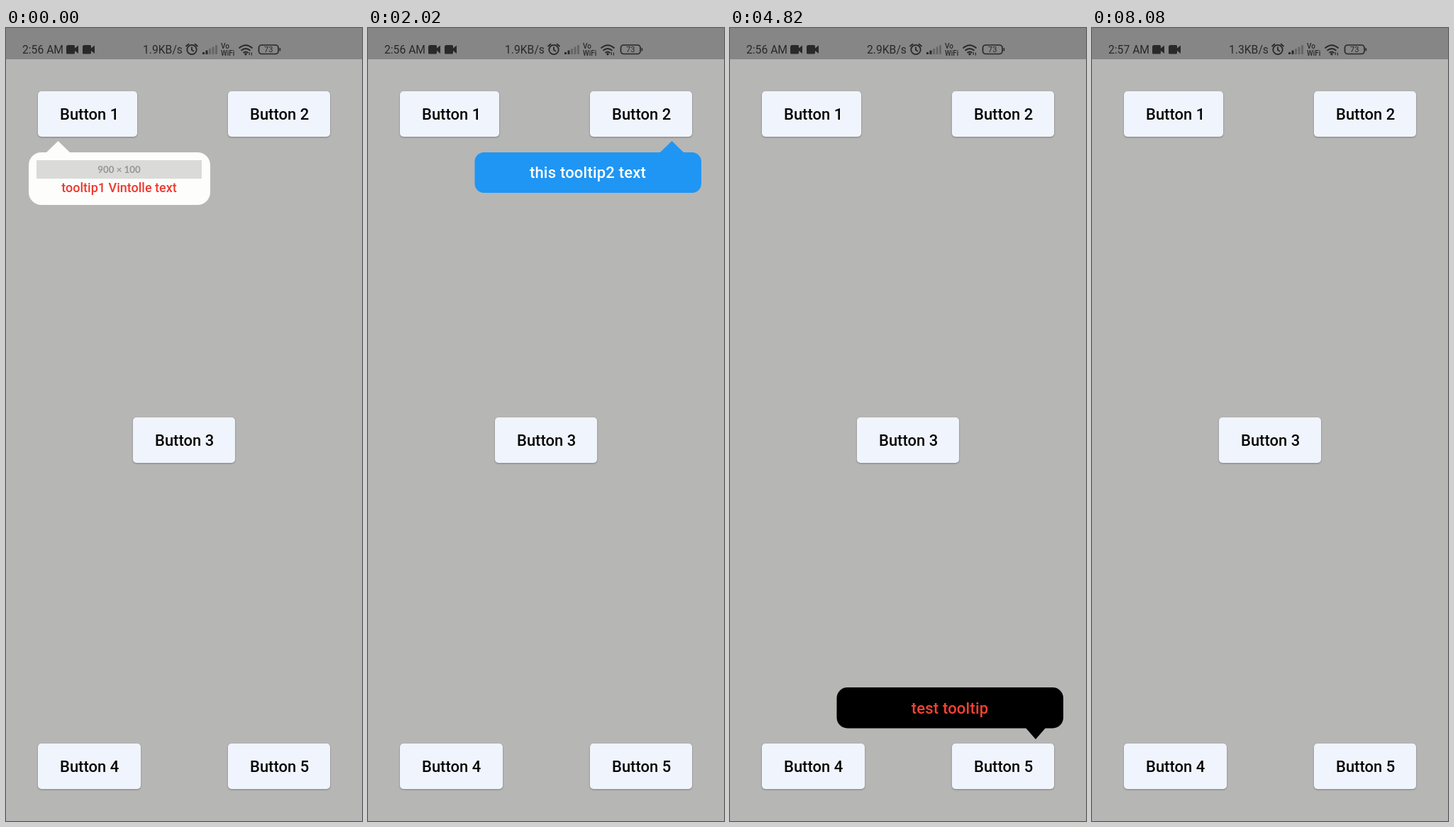
These frames come from a looping animation (502x1116 px, 8.12 s). An HTML page:

```html
<!DOCTYPE html>
<html lang="en">
<head>
<meta charset="utf-8">
<title>Tooltip tour</title>
<style>
  html, body { margin: 0; width: 100%; height: 100%; overflow: hidden; background: #b6b6b5; }
  svg { display: block; width: 502px; height: 1116px; }
  text { font-family: Roboto, "Open Sans", sans-serif; white-space: pre; }
  .label { font-size: 22px; font-weight: 500; fill: #050505; }
  .button { fill: #f0f4fc; filter: drop-shadow(0 1px 1px rgba(0, 0, 0, .3)); }
  .status { font-size: 15.7px; fill: #292929; }
  .tip { visibility: hidden; }
  .tip text { font-weight: 500; }
  .tip .size { font-family: Lato, sans-serif; font-weight: 700; fill: #969696; }
</style>
</head>
<body>
<svg viewBox="0 0 502 1116">
  <rect width="502" height="1116" fill="#b6b6b5"/>
  <rect width="502" height="44" fill="#868686"/>

  <g class="status">
    <text id="clock" x="23" y="36"></text>
    <text id="speed" x="193" y="36"></text>
    <path id="cam" d="M86.5 24h9q1.500 0 1.500 1.500v3l5-4v11.500l-5-4v3q0 1.500-1.500 1.500h-9q-1.500 0-1.500-1.500v-9q0-1.500 1.500-1.500z"/>
    <use href="#cam" x="23"/>
    <g fill="none" stroke="#292929" stroke-width="1.8">
      <circle cx="262" cy="30.500" r="6.700"/>
      <path d="M262 26.500v4.500l3 1.800M253.500 26l4.500-3.800M270.500 26l-4.500-3.800"/>
    </g>
    <g id="bars"></g>
    <g font-size="10" font-weight="500">
      <text x="303" y="28.500">Vo</text>
      <text x="303" y="38.500">WiFi</text>
    </g>
    <g fill="none" stroke="#292929" stroke-width="1.900">
      <path d="M328.500 28.500q9.500-8.500 19 0M331.500 31.800q6.500-5.600 13 0M334.500 35q3.500-3 7 0"/>
    </g>
    <circle cx="338" cy="36.800" r="1.700"/>
    <path d="M343.200 38v-4M346.400 34.500v4" stroke="#292929" stroke-width="1.200"/>
    <rect x="356.500" y="24" width="27.500" height="12.500" rx="4" fill="none" stroke="#292929" stroke-width="1.700"/>
    <rect x="385.500" y="28" width="1.700" height="4.500" rx=".8"/>
    <text x="370.200" y="34.200" font-size="11" text-anchor="middle">73</text>
  </g>

  <g id="buttons"></g>
  <g id="tips"></g>
</svg>

<script>
const LOOP = 8120;
const $ = id => document.getElementById(id);

function add(parent, tag, attrs, text = "") {
  const el = document.createElementNS("http://www.w3.org/2000/svg", tag);
  for (const key in attrs) el.setAttribute(key, attrs[key]);
  el.textContent = text;
  parent.append(el);
  return el;
}

for (let i = 0; i < 5; i++) {
  const h = 3 + i * 2.5;
  add($("bars"), "rect", { x: 277 + i * 4.5, y: 37 - h, width: 3, height: h, rx: .6,
    fill: i < 2 ? "#292929" : "#666" });
}

// x, y, width
[[45, 89, 140], [313, 89, 144], [179, 548, 144], [45, 1007, 145], [313, 1007, 144]]
  .forEach(([x, y, width], i) => {
    add($("buttons"), "rect", { class: "button", x, y, width, height: 64, rx: 5 });
    add($("buttons"), "text", { class: "label", x: x + 31, y: y + 40 }, "Button " + (i + 1));
  });

// box: x, y, width, height, radius; tip: x, y, half width; line: text, x, baseline
const tips = [
  { from: 0, to: 1200, fill: "#fdfdfc", box: [32, 175, 256, 74, 18], tip: [73.5, 159, 17],
    image: [43, 186, 233, 26, 13.3], color: "#ec3a30", size: 18, anchor: "middle",
    lines: [["tooltip1 Vintolle text", 159.5, 231]] },
  { from: 1200, to: 2060, fill: "#1f96f3", box: [150.5, 175, 319.5, 57, 13], tip: [428.5, 159, 17],
    color: "#fff", size: 22, space: .2, anchor: "middle",
    lines: [["this tooltip2 text", 310, 211]] },
  { from: 2060, to: 3100, fill: "#000", box: [149, 634, 204, 75.5, 4], tip: [251, 617, 14],
    image: [159, 644, 184, 20.5, 10.4], color: "#ff9810", size: 24, anchor: "middle",
    lines: [["3rd Vintolle text", 250.5, 691]] },
  { from: 3100, to: 4600, fill: "#000", box: [32, 900, 243, 84, 10], tip: [71, 1001, 14],
    color: "#fff", size: 22, space: .2, anchor: "start",
    lines: [["this is without tooltip", 43, 935], ["image", 43, 966]] },
  { from: 4600, to: 6240, fill: "#000", box: [150.5, 928, 319.5, 57.5, 15], tip: [431, 1001, 14],
    color: "#f44336", size: 22, space: .2, anchor: "middle",
    lines: [["test tooltip", 310, 965]] }
];

for (const t of tips) {
  const [x, y, width, height, rx] = t.box;
  const [tx, ty, half] = t.tip;
  const edge = ty < y ? y + .5 : y + height - .5;
  t.el = add($("tips"), "g", { class: "tip" });
  add(t.el, "rect", { x, y, width, height, rx, fill: t.fill });
  add(t.el, "path", { d: `M${tx} ${ty}L${tx + half} ${edge}H${tx - half}z`, fill: t.fill });
  if (t.image) {
    const [ix, iy, w, h, size] = t.image;
    add(t.el, "rect", { x: ix, y: iy, width: w, height: h, fill: "#dadad9" });
    add(t.el, "text", { class: "size", x: ix + w / 2, y: iy + h / 2 + size * .36,
      "font-size": size, "text-anchor": "middle" }, "900 × 100");
  }
  for (const [text, lx, ly] of t.lines)
    add(t.el, "text", { x: lx, y: ly, fill: t.color, "font-size": t.size,
      "text-anchor": t.anchor, "letter-spacing": t.space || 0 }, text);
}

const clock = [[0, "2:56 AM"], [7000, "2:57 AM"]];
const speed = [[0, "1.9KB/s"], [3000, "2.9KB/s"], [6100, "1.3KB/s"]];
const valueAt = (steps, t) => steps.filter(s => s[0] <= t).pop()[1];

function draw(t) {
  for (const tip of tips)
    tip.el.style.visibility = t >= tip.from && t < tip.to ? "visible" : "hidden";
  $("clock").textContent = valueAt(clock, t);
  $("speed").textContent = valueAt(speed, t);
}

const start = performance.now();
function tick() {
  draw((performance.now() - start) % LOOP);
  requestAnimationFrame(tick);
}
tick();
</script>
</body>
</html>
```
